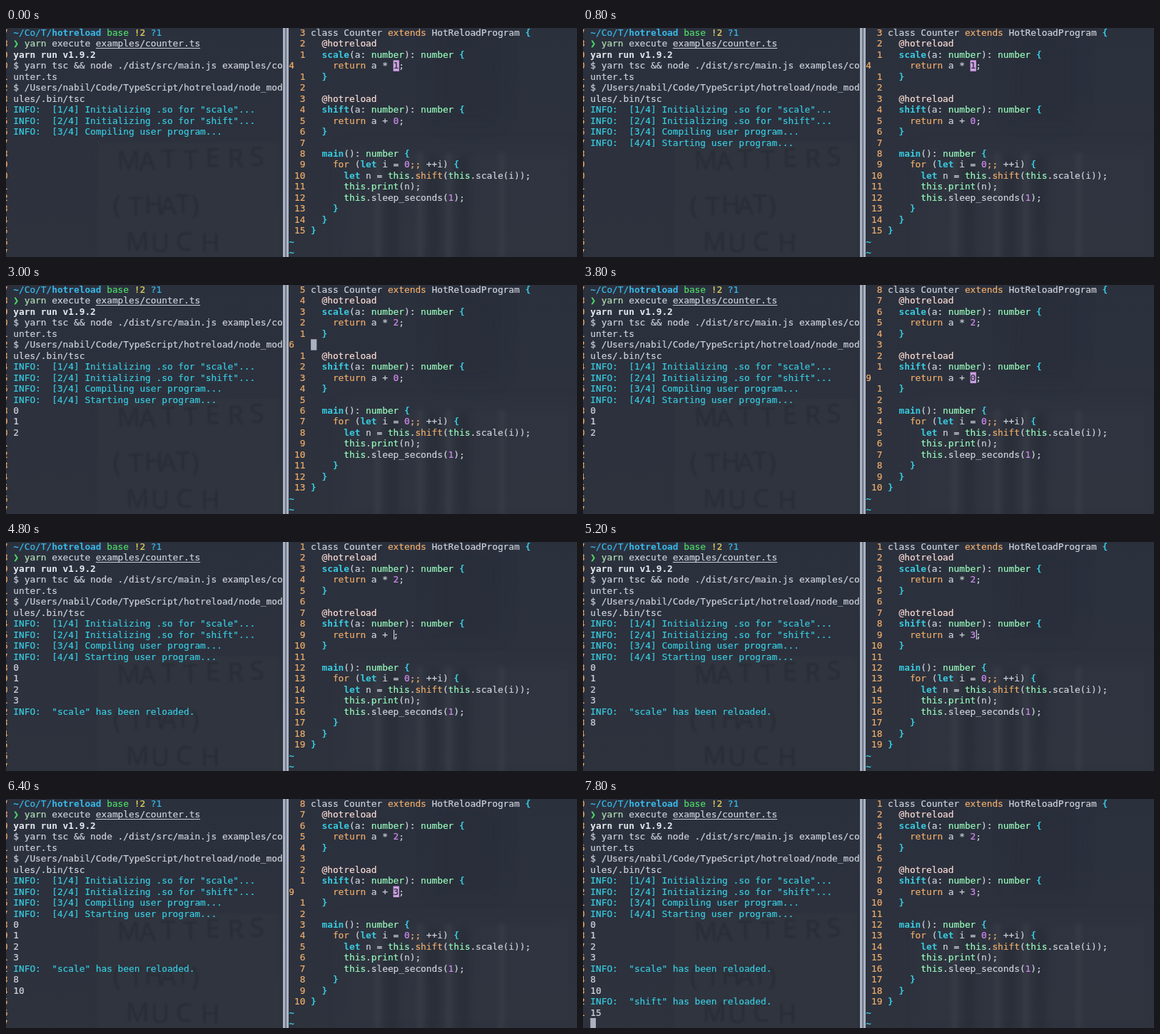
An HTML page with a canvas for the animation above (8000 ms loop, 800 by 322 pixels).

```html
<!DOCTYPE html>
<html lang="en">
<head>
<meta charset="utf-8">
<title>Hot reload in the terminal</title>
<style>
html, body { margin: 0; width: 100%; height: 100%; overflow: hidden; background: #2c303c; }
canvas { display: block; width: 800px; height: 322px; }
</style>
</head>
<body>
<canvas id="stage"></canvas>
<script>
const W = 800, H = 322, LOOP = 8000, STEP = 200;
const CW = 7.7, ROW = 15.45, TOP = -1, BASE = 12;
const LEFT = 10.3, RIGHT = 396.3;
const FONT = '12.79px "DejaVu Sans Mono", monospace';
const C = {
  text: '#cdd2da', white: '#e6eaf0', cyan: '#38cbe0', blue: '#37b9e8', green: '#4fdc68',
  mint: '#98fbbc', orange: '#eeac6a', yellow: '#e5d45c', purple: '#d08aee', pink: '#fcddd5',
  cursor: '#abb1be', lilac: '#cfa0e4', dark: '#2d303b', sign: '#7c7c7d', warn: '#e5826f'
};

const canvas = document.getElementById('stage');
const ratio = window.devicePixelRatio || 1;
canvas.width = W * ratio;
canvas.height = H * ratio;
const ctx = canvas.getContext('2d');
ctx.scale(ratio, ratio);

const rowTop = row => TOP + row * ROW;

function box(x, y, w, h, color) {
  ctx.fillStyle = color;
  ctx.fillRect(x, y, w, h);
}

// Places text on the character grid and returns the x after it.
// The thin outline gives the strokes a little more weight.
function put(x, row, text, color, bold) {
  const y = rowTop(row) + BASE;
  ctx.font = (bold ? 'bold ' : '') + FONT;
  ctx.fillStyle = ctx.strokeStyle = color;
  ctx.lineWidth = 0.2;
  for (const ch of text) {
    if (ch !== ' ') {
      ctx.fillText(ch, x, y);
      if (!bold) ctx.strokeText(ch, x, y);
    }
    x += CW;
  }
  return x;
}

function putRuns(x, row, runs) {
  for (const [text, color, bold] of runs) x = put(x, row, text, color, bold);
}

// ---- backdrop ----

function softRect(x, y, w, h, color, blur) {
  ctx.save();
  ctx.filter = `blur(${blur}px)`;
  box(x, y, w, h, color);
  ctx.restore();
}

function scrawl(text, x, y, gap, tilt) {
  ctx.save();
  ctx.translate(x, y);
  ctx.rotate(tilt);
  ctx.filter = 'blur(0.8px)';
  ctx.font = '36px "Open Sans", sans-serif';
  ctx.fillStyle = 'rgba(20, 22, 29, 0.24)';
  [...text].forEach((ch, i) => ctx.fillText(ch, i * gap, (i % 2) * 2));
  ctx.restore();
}

function drawBackdrop() {
  const g = ctx.createLinearGradient(0, 0, 0, H);
  g.addColorStop(0, '#2b303d');
  g.addColorStop(1, '#2d323d');
  box(0, 0, W, H, g);
  softRect(128, 160, 256, 170, 'rgba(70, 72, 74, 0.14)', 3);
  softRect(600, 0, 90, 130, 'rgba(20, 22, 30, 0.1)', 14);
  softRect(470, 165, 330, 160, 'rgba(80, 82, 88, 0.08)', 10);
  for (const x of [516, 576, 616, 690]) softRect(x, 175, 9, 150, 'rgba(105, 108, 115, 0.12)', 3);
  for (const x of [534, 592, 634]) softRect(x, 180, 14, 145, 'rgba(20, 22, 30, 0.18)', 4);
  scrawl('MATTERS', 156, 199, 31, -0.03);
  scrawl('(THAT)', 150, 262, 22, -0.02);
  scrawl('MUCH', 168, 313, 35, 0);
}

// ---- terminal on the left ----

const plain = text => [[text, C.text]];
const info = text => [['INFO:  ' + text, C.cyan]];

// Each entry: time of appearance, then the runs of one row.
const log = [
  [0, [['~', C.blue, true], ['/Co/T/', C.blue], ['hotreload', C.blue, true],
       [' base', C.green], [' !2', C.yellow], [' ?1', C.blue]]],
  [0, [['❯ ', C.green], ['yarn', '#b4dfb5'], [' execute examples/counter.ts', C.text]]],
  [0, [['yarn run v1.9.2', C.white, true]]],
  [0, plain('$ yarn tsc && node ./dist/src/main.js examples/co')],
  [0, plain('unter.ts')],
  [0, plain('$ /Users/nabil/Code/TypeScript/hotreload/node_mod')],
  [0, plain('ules/.bin/tsc')],
  [0, info('[1/4] Initializing .so for "scale"...')],
  [0, info('[2/4] Initializing .so for "shift"...')],
  [0, info('[3/4] Compiling user program...')],
  [800, info('[4/4] Starting user program...')],
  [1000, plain('0')],
  [2000, plain('1')],
  [3000, plain('2')],
  [4000, plain('3')],
  [4400, info('"scale" has been reloaded.')],
  [5000, plain('8')],
  [6000, plain('10')],
  [6600, info('"shift" has been reloaded.')],
  [7000, plain('15')]
];
const FOCUS_LEFT = 7600;

function drawTerminal(t) {
  const focused = t >= FOCUS_LEFT;
  const last = log.length;
  for (let row = 0; row <= last; row++) {
    const n = focused ? last - row : row + 7;
    if (!focused || row < last) put(LEFT - 2 * CW, row, String(n % 10), C.orange);
  }
  log.forEach(([at, runs], row) => { if (t >= at) putRuns(LEFT, row, runs); });
  box(LEFT + 15 * CW, rowTop(1) + BASE + 1.5, 19 * CW, 1, C.text);
  if (focused) box(LEFT, rowTop(last), CW, 15, C.cursor);
}

// ---- editor on the right ----

const rules = [
  [/^@\w+/, C.pink],
  [/^(number|this|print)\b/, C.mint],
  [/^(let\b|[{}])/, C.cyan, true],
  [/^(for\b|return\b|extends\b|;;|shift(?=\(this))/, C.orange],
  [/^(scale|shift|main)(?=\((a|\)))/, C.cyan, true],
  [/^\d/, C.purple],
  [/^(\w+|.)/, C.text]
];

function highlight(line) {
  const runs = [];
  while (line) {
    const [re, color, bold] = rules.find(([r]) => r.test(line));
    const word = line.match(re)[0];
    runs.push([word, color, bold]);
    line = line.slice(word.length);
  }
  return runs;
}

const source = (factor, offset) => [
  'class Counter extends HotReloadProgram {',
  '  @hotreload',
  '  scale(a: number): number {',
  `    return a * ${factor};`,
  '  }',
  '',
  '  @hotreload',
  '  shift(a: number): number {',
  `    return a + ${offset};`,
  '  }',
  '',
  '  main(): number {',
  '    for (let i = 0;; ++i) {',
  '      let n = this.shift(this.scale(i));',
  '      this.print(n);',
  '      this.sleep_seconds(1);',
  '    }',
  '  }',
  '}'
];

// Cursor steps: time, row, column, insert mode.
const moves = [
  [0, 3, 15, false],
  [1600, 3, 15, true],
  [2000, 3, 16, true],
  [2200, 3, 15, false],
  [2800, 4, 2, false],
  [3000, 5, 0, false],
  [3200, 6, 11, false],
  [3400, 7, 15, false],
  [3600, 8, 15, false],
  [4400, 8, 15, true],
  [5200, 8, 16, true],
  [5400, 8, 15, false]
];

const digit = (t, cut, typed, before, after) => t < cut ? before : t < typed ? '' : after;

function drawEditor(t) {
  const lines = source(digit(t, 1600, 2000, '1', '2'), digit(t, 4400, 5200, '0', '3'));
  const [, row, col, insert] = moves.filter(m => t >= m[0]).pop();
  const focused = t < FOCUS_LEFT;
  const relative = focused && !insert;
  const lint = t >= 5400 && t < 6000;
  const gutter = RIGHT + (lint ? 2 * CW : 0);
  const x = gutter + 4 * CW;

  if (lint) {
    box(RIGHT, 0, 2 * CW, rowTop(lines.length), C.sign);
    box(RIGHT, rowTop(row), 2 * CW, ROW, '#6b4853');
    put(RIGHT, row, '>>', C.warn);
    box(x + 19 * CW, rowTop(row) + 1, 20 * CW, ROW - 2, '#4c3a48');
    put(x + 19 * CW, row, 'Expression expected.', C.warn);
  }

  lines.forEach((line, i) => {
    const current = relative && i === row;
    const n = String(relative && !current ? Math.abs(i - row) : i + 1);
    put(gutter + (current ? 0 : (3 - n.length) * CW), i, n, C.orange);
    putRuns(x, i, highlight(line));
  });
  for (const i of [19, 20]) put(RIGHT, i, '~', C.cyan, true);

  if (!focused) return;
  const cx = x + col * CW, cy = rowTop(row);
  if (insert) {
    box(cx + 0.5, cy + 1, 1, ROW - 2, C.white);
  } else {
    const ch = lines[row][col] || ' ';
    box(cx, cy, CW + 0.5, ROW, /\d/.test(ch) ? C.lilac : C.cursor);
    put(cx, row, ch, C.dark);
  }
}

function drawDivider() {
  box(388, 0, 8, H, '#a9b2c3');
  box(391.5, 0, 1.2, H, '#4a4f5e');
}

// The backdrop never changes, so it is painted once.
drawBackdrop();
const backdrop = document.createElement('canvas');
backdrop.width = canvas.width;
backdrop.height = canvas.height;
backdrop.getContext('2d').drawImage(canvas, 0, 0);

const start = performance.now();
function frame() {
  const t = Math.floor(((performance.now() - start) % LOOP) / STEP) * STEP;
  ctx.drawImage(backdrop, 0, 0, W, H);
  drawTerminal(t);
  drawDivider();
  drawEditor(t);
  requestAnimationFrame(frame);
}
frame();
</script>
</body>
</html>
```
